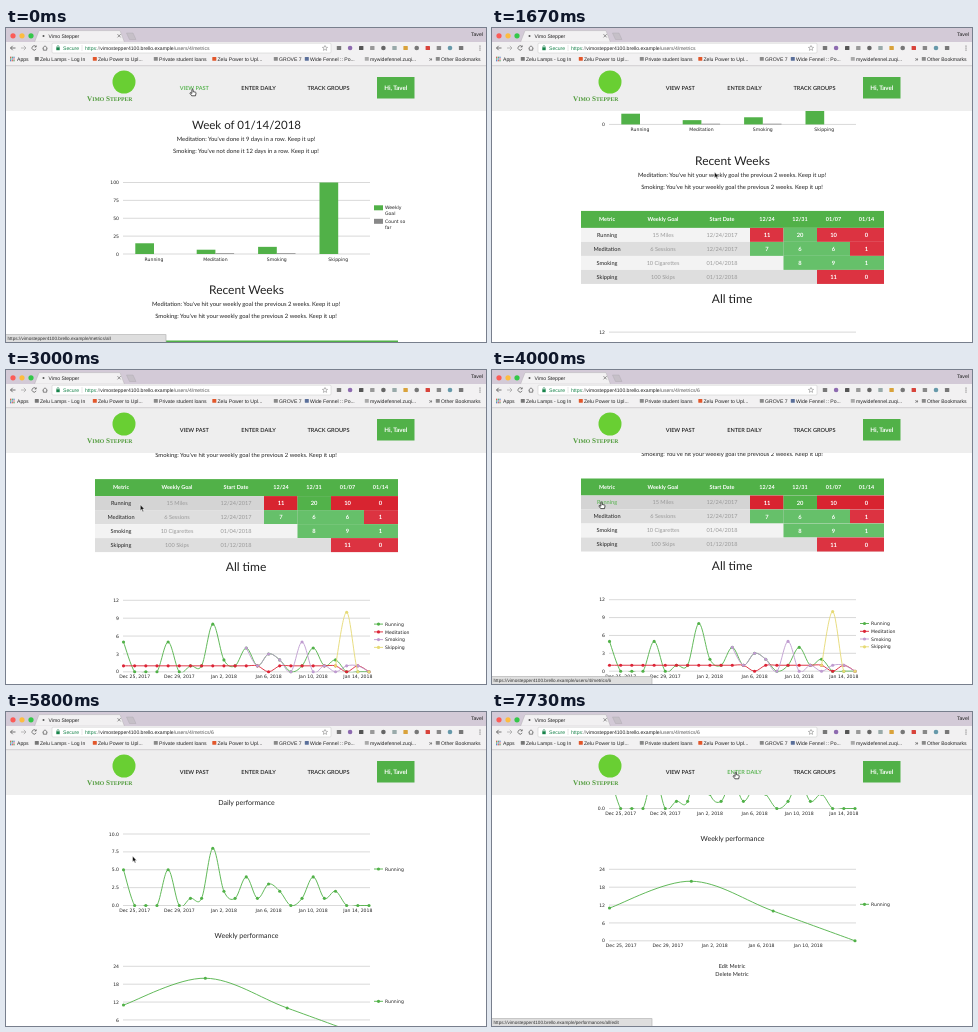
Write an HTML page that moves like this. It is 480 px wide and 314 px high and loops after 8000 ms.

```html
<!DOCTYPE html>
<html lang="en">
<head>
<meta charset="utf-8">
<title>Vimo Stepper</title>
<style>
  html, body { margin: 0; width: 100%; height: 100%; overflow: hidden; background: #fff; }
  svg { display: block; width: 480px; height: 314px; }
  text { text-rendering: geometricPrecision; white-space: pre; }
  .ui { font-family: "Liberation Sans", Arial, sans-serif; }
  .page { font-family: Lato, "Open Sans", sans-serif; }
  .chart { font-family: "DejaVu Sans", Verdana, sans-serif; }
  .row.light .bg { fill: #f3f3f3; }
  .row.dark .bg { fill: #dedede; }
  .row.on .bg { fill: #d4d4d4; }
  .good { fill: #66c06a; }
  .bad { fill: #dc3341; }
  .on .good { fill: #52b24a; }
  .on .bad { fill: #d82430; }
  .link { fill: #222; }
  .link.on { fill: #51b148; }
</style>
</head>
<body>
<svg id="stage" viewBox="0 0 480 314"></svg>
<script>
const GREEN = '#51b148', RED = '#dc2436', PURPLE = '#bf9bd0', YELLOW = '#e6da74';
const HOST = 'vimostepper4100.brello.example';
const LOOP = 8000, TICK = 1000 / 15;

// y is the middle of the lower-case letters
const text = (x, y, str, size, o = {}) =>
  `<text x="${x}" y="${y + size * 0.35}" font-size="${size}" fill="${o.fill || '#222'}"` +
  ` text-anchor="${o.anchor || 'start'}" font-weight="${o.weight || 400}"` +
  `${o.cls ? ` class="${o.cls}"` : ''}${o.id ? ` id="${o.id}"` : ''}>${str}</text>`;
const mid = (x, y, str, size, o = {}) => text(x, y, str, size, { ...o, anchor: 'middle' });
const rect = (x, y, w, h, fill, more = '') =>
  `<rect x="${x}" y="${y}" width="${w}" height="${h}" fill="${fill}" ${more}/>`;
const dot = (x, y, r, fill) => `<circle cx="${x}" cy="${y}" r="${r}" fill="${fill}"/>`;
const line = (d, stroke, w = 0.7, more = '') =>
  `<path d="${d}" fill="none" stroke="${stroke}" stroke-width="${w}" ${more}/>`;

// ---------- charts ----------
const LEFT = 117.5, RIGHT = 363, PLOT_H = 71.5;

function grid(top, labels) {
  return labels.map((label, i) => {
    const y = top + PLOT_H * i / (labels.length - 1);
    return line(`M117 ${y}H364`, '#d0d0d0', 0.8) +
      text(113, y, label, 4.6, { anchor: 'end' });
  }).join('');
}

function dateAxis(y, step, count) {
  const names = ['Dec 25, 2017', 'Dec 29, 2017', 'Jan 2, 2018', 'Jan 6, 2018', 'Jan 10, 2018', 'Jan 14, 2018'];
  return names.slice(0, count).map((n, i) => mid(LEFT + step * (1 + 4 * i), y, n, 4.6)).join('');
}

function curve(points) {
  let d = 'M' + points[0];
  for (let i = 0; i + 1 < points.length; i++) {
    const a = points[i], b = points[i + 1];
    const before = points[i - 1] || a, after = points[i + 2] || b;
    const c1 = a.map((v, k) => v + (b[k] - before[k]) / 6);
    const c2 = b.map((v, k) => v - (after[k] - a[k]) / 6);
    d += `C${c1} ${c2} ${b}`;
  }
  return d;
}

function series(values, top, max, color, clip, slots = values.length) {
  const step = (RIGHT - LEFT) / (slots - 1), skip = slots - values.length;
  const points = values.map((v, i) => [LEFT + step * (i + skip), top + PLOT_H * (1 - v / max)]);
  return line(curve(points), color, 0.9, `clip-path="url(#${clip})"`) +
    points.map(p => dot(p[0], p[1], 1.55, color)).join('');
}

const clipBox = (id, top) =>
  `<clipPath id="${id}">${rect(114, top - 3, 253, PLOT_H + 3.5, '#000')}</clipPath>`;
const legend = (y, name, color) =>
  line(`M368 ${y}H377`, color, 0.9) + dot(372.5, y, 1.6, color) + text(379, y, name, 4.6);

const running = [5, 0, 0, 0, 5, 0, 1, 1, 8, 2, 1, 4, 1, 3, 2, 0, 1, 4, 1, 2, 0, 0, 0];
const meditation = running.map((v, i) => [13, 20, 22].includes(i) ? 0 : 1);
const smoking = [4, 1, 3, 2, 0, 5, 0, 1, 0, 1, 1, 0];
const skipping = [1, 10, 0, 0];

// ---------- first page ----------
function barChart() {
  const top = 154.5, base = top + PLOT_H;
  const bars = [['Running', 15, 0], ['Meditation', 6, 1], ['Smoking', 10, 1], ['Skipping', 100, 0]];
  const bar = (x, v, fill) => rect(x, base - v * PLOT_H / 100, 18.7, v * PLOT_H / 100, fill);
  return grid(top, [100, 75, 50, 25, 0]) +
    bars.map(([name, goal, count], i) => {
      const x = 148 + 61.4 * i;
      return bar(x - 18.7, goal, GREEN) + bar(x, count, '#888') + mid(x, base + 5, name, 4.6);
    }).join('') +
    rect(368, 177.3, 9, 5, GREEN) + text(379, 179.8, 'Weekly', 4.6) + text(379, 185.8, 'Goal', 4.6) +
    rect(368, 190.8, 9, 5, '#888') + text(379, 193.3, 'Count so', 4.6) + text(379, 199.3, 'far', 4.6);
}

const TABLE_Y = 312.5, HEAD_H = 17, ROW_H = 14;

function table() {
  const centres = [115, 171, 230, 275, 308, 341.5, 374.5];
  const edges = [258, 291.5, 325, 358, 392];
  const heads = ['Metric', 'Weekly Goal', 'Start Date', '12/24', '12/31', '01/07', '01/14'];
  // a leading minus marks a missed goal
  const rows = [
    ['Running', '15 Miles', '12/24/2017', '-11', '20', '-10', '-0'],
    ['Meditation', '6 Sessions', '12/24/2017', '7', '6', '6', '-1'],
    ['Smoking', '10 Cigarettes', '01/04/2018', '', '8', '9', '1'],
    ['Skipping', '100 Skips', '01/12/2018', '', '', '-11', '-0']
  ];
  const head = rect(89, TABLE_Y, 303, HEAD_H, GREEN) + heads.map((h, i) =>
    mid(centres[i], TABLE_Y + 8.3, h, 5.5, { fill: '#fff', weight: 700 })).join('');
  return head + rows.map((cells, r) => {
    const y = TABLE_Y + HEAD_H + r * ROW_H;
    const body = cells.map((c, i) => {
      if (i < 3) {
        return mid(centres[i], y + 7, c, 5.6, i ? { fill: '#999' }
          : { cls: 'link', id: r ? '' : 'metricLink' });
      }
      if (!c) return '';
      const cls = c[0] === '-' ? 'bad' : 'good', x = edges[i - 3];
      return `<rect x="${x}" y="${y}" width="${edges[i - 2] - x}" height="${ROW_H}" class="${cls}"/>` +
        mid(centres[i], y + 7, c.replace('-', ''), 5.8, { fill: '#fff', weight: 700 });
    }).join('');
    return `<g class="row ${r % 2 ? 'dark' : 'light'}">` +
      `<rect class="bg" x="89" y="${y}" width="303" height="${ROW_H}"/>${body}</g>`;
  }).join('');
}

function overview() {
  const top = 433.7;
  return mid(240.5, 97, 'Week of 01/14/2018', 11.5) +
    mid(240, 111.3, "Meditation: You've done it 9 days in a row. Keep it up!", 5.9) +
    mid(240, 123.3, "Smoking: You've not done it 12 days in a row. Keep it up!", 5.9) +
    `<g class="chart">${barChart()}</g>` +
    mid(240.5, 262, 'Recent Weeks', 12) +
    mid(240, 276.3, "Meditation: You've hit your weekly goal the previous 2 weeks. Keep it up!", 5.9) +
    mid(240, 288.3, "Smoking: You've hit your weekly goal the previous 2 weeks. Keep it up!", 5.9) +
    table() +
    mid(240, 400, 'All time', 12) +
    `<g class="chart">${clipBox('allClip', top)}${grid(top, [12, 9, 6, 3, 0])}` +
    series(running, top, 12, GREEN, 'allClip') +
    series(meditation, top, 12, RED, 'allClip') +
    series(smoking, top, 12, PURPLE, 'allClip', 23) +
    series(skipping, top, 12, YELLOW, 'allClip', 23) +
    dateAxis(510, 11.16, 6) +
    legend(457.5, 'Running', GREEN) + legend(465.3, 'Meditation', RED) +
    legend(473, 'Smoking', PURPLE) + legend(480.8, 'Skipping', YELLOW) + '</g>';
}

// ---------- second page ----------
function detail() {
  const day = 31, week = 163.3;
  return mid(240.5, 0, 'Daily performance', 7) +
    mid(240.5, 132.5, 'Weekly performance', 7) +
    `<g class="chart">${clipBox('dayClip', day)}${clipBox('weekClip', week)}` +
    grid(day, ['10.0', '7.5', '5.0', '2.5', '0.0']) + series(running, day, 10, GREEN, 'dayClip') +
    dateAxis(107.2, 11.16, 6) + legend(66, 'Running', GREEN) +
    grid(week, [24, 18, 12, 6, 0]) + series([11, 20, 10, 0], week, 24, GREEN, 'weekClip') +
    dateAxis(239.7, 11.69, 5) + legend(198.3, 'Running', GREEN) + '</g>' +
    mid(240, 260.3, 'Edit Metric', 5.5) + mid(240, 268.3, 'Delete Metric', 5.5);
}

// ---------- browser window ----------
function browser() {
  const marks = [[34, 'Zelu Lamps - Log In', '#777'], [92, 'Zelu Power to Upl...', '#e2572b'],
    [153, 'Private student loans', '#8a8a8a'], [211.5, 'Zelu Power to Upl...', '#e2572b'],
    [273, 'GROVE 7', '#8a8a8a'], [304, 'Wide Fennel :: Po...', '#5a6f9a'],
    [364, 'mywidefennel.zuqi...', '#aaa'], [435, 'Other Bookmarks', '#8a8a8a']];
  const tools = ['#777', '#8d6ab0', '#555', '#999', '#666', '#9aa', '#d9a23b', '#777', '#d8433b', '#888', '#69a', '#777'];
  return rect(0, 0, 480, 14, '#d3cad7') + rect(0, 14, 480, 24, '#f2f1f2') +
    dot(7, 7.8, 2.6, '#fc5b57') + dot(16, 7.8, 2.6, '#fdbc40') + dot(25, 7.8, 2.6, '#34c749') +
    '<path d="M28.5 14.2L33 2.6H114L118.5 14.2Z" fill="#f2f1f2" stroke="#b4b1b4" stroke-width=".5"/>' +
    rect(28, 14, 91, 1, '#f2f1f2') +
    '<path d="M120.5 5H127L130 11.5H123.5Z" fill="#c6c0c8" stroke="#aaa5ac" stroke-width=".4"/>' +
    dot(37.5, 8, 1, '#555') + text(42.5, 8, 'Vimo Stepper', 5.1) +
    line('M111.5 6.2L114.7 9.4M114.7 6.2L111.5 9.4', '#666', 0.7) +
    text(477, 6, 'Tavel', 5.2, { anchor: 'end' }) +
    line('M9.5 20H4.5M6.7 17.8L4.5 20L6.7 22.2', '#555', 0.8) +
    line('M15 20H20M17.8 17.8L20 20L17.8 22.2', '#aaa', 0.8) +
    line('M30 18.7A2.2 2.2 0 1 0 30.2 20.8M30.2 17.4V19H28.6', '#555', 0.7) +
    line('M36.5 20.2L39 17.8L41.5 20.2M37.3 19.8V22.2H40.7V19.8', '#555', 0.7) +
    rect(46, 15.2, 279, 9.8, '#fff', 'rx="1" stroke="#c4c4c4" stroke-width=".5"') +
    rect(50.3, 19.3, 3.4, 2.9, '#17834a') + line('M51 19.5V18.6A1 1 0 0 1 53 18.6V19.5', '#17834a', 0.6) +
    text(57, 20, 'Secure', 5.1, { fill: '#17834a' }) + line('M76 17V23', '#ccc', 0.5) +
    `<text x="79" y="21.8" font-size="5.08" fill="#17834a">https<tspan fill="#777">://</tspan>` +
    `<tspan fill="#222">${HOST}</tspan><tspan fill="#555" id="path"></tspan></text>` +
    line('M319 17.5L319.8 19.2L321.6 19.4L320.2 20.6L320.6 22.4L319 21.4L317.4 22.4L317.8 20.6L316.4 19.4L318.2 19.2Z', '#777', 0.5) +
    tools.map((c, i) => i % 3 === 1 ? dot(333 + i * 11.1, 20, 2.3, c)
      : rect(330.8 + i * 11.1, 17.9, 4.4, 4.2, c, 'rx=".6"')).join('') +
    [18, 20, 22].map(y => dot(474, y, 0.6, '#555')).join('') +
    [0, 1, 2].map(i => [0, 1, 2].map(j =>
      rect(4 + i * 1.7, 28.7 + j * 1.7, 1.2, 1.2, ['#d8504a', '#4a9a58', '#4a78c8'][(i + j) % 3])).join('')).join('') +
    text(11, 31, 'Apps', 5.1) + text(423, 31, '»', 6) +
    marks.map(([x, name, c]) => rect(x - 5.2, 29, 4, 3.8, c, 'rx=".5"') + text(x, 31, name, 5.1)).join('') +
    line('M0 37.7H480', '#b9b7b9', 0.6);
}

const nav = (x, label, id) =>
  mid(x, 59.6, label, 5.6, { weight: 600, cls: 'link', id });

const header = () => rect(0, 38, 480, 45, '#eeeeee') +
  dot(118, 54, 11.5, '#69cf33') +
  `<text x="81" y="73.2" font-size="7.2" fill="#4f9a3a" font-weight="700" font-family="'Liberation Serif', Times, serif">` +
  'V<tspan font-size="5.7">IMO</tspan> S<tspan font-size="5.7">TEPPER</tspan></text>' +
  nav(188.3, 'VIEW PAST', 'navPast') + nav(252.5, 'ENTER DAILY', 'navDaily') + nav(322.5, 'TRACK GROUPS', 'navGroups') +
  rect(371, 49, 37.5, 21.5, GREEN) + mid(389.8, 59.8, 'Hi, Tavel', 6.2, { fill: '#fff', weight: 700 });

const pointers = {
  arrow: '<path d="M0 0V6L1.4 4.8L2.4 7L3.4 6.6L2.4 4.4H4.2Z" fill="#111" stroke="#fff" stroke-width=".5"/>',
  hand: '<path d="M-.6 .3Q0-.4 .6 .3V2.5L3 3Q3.6 3.2 3.5 4L3 6.6H-.8L-2.6 4Q-2.4 3-1.4 3.7L-.6 4.3Z" fill="#fff" stroke="#111" stroke-width=".7"/>',
  beam: line('M-1.2-2.5Q0-2.5 0-1.7Q0-2.5 1.2-2.5M0-1.7V3.2M-1.2 4Q0 4 0 3.2Q0 4 1.2 4', '#111', 0.7)
};

document.getElementById('stage').innerHTML =
  rect(0, 0, 480, 314, '#fff') +
  `<g class="page"><g id="overview">${overview()}</g><g id="detail">${detail()}</g>${header()}</g>` +
  `<g class="ui">${browser()}<g id="status">` +
  rect(-1, 306.7, 161, 8, '#dedede', 'stroke="#aaa" stroke-width=".6"') +
  text(1.5, 310.3, '', 4.65, { id: 'statusText', fill: '#333' }) + '</g></g>' +
  '<g id="pointer">' + Object.keys(pointers).map(k => `<g id="${k}">${pointers[k]}</g>`).join('') + '</g>';

// ---------- motion: [time, value...] ----------
const pointerKeys = [[70, 186.5, 61.2], [560, 222.5, 144], [2470, 222.5, 144], [3230, 109.5, 132],
  [4400, 109.5, 132], [5100, 126.5, 144], [6870, 126.5, 144], [7700, 243.7, 60.2]];
const overviewKeys = [[730, 0], [870, 10], [1066, 37], [1666, 129.5], [2330, 202.5], [2700, 202.5], [3200, 204]];
const detailKeys = [[4700, 124], [5200, 112], [5800, 91], [5930, 76], [6050, 70], [6330, -6]];

function at(keys, t, ease = u => u) {
  if (t <= keys[0][0]) return keys[0].slice(1);
  const i = keys.findIndex(k => k[0] > t);
  if (i < 0) return keys[keys.length - 1].slice(1);
  const a = keys[i - 1], b = keys[i], u = ease((t - a[0]) / (b[0] - a[0]));
  return a.slice(1).map((v, k) => v + (b[k + 1] - v) * u);
}
const smooth = u => u * u * (3 - 2 * u);

const $ = id => document.getElementById(id);
const show = (id, on) => $(id).setAttribute('visibility', on ? 'visible' : 'hidden');
const move = (id, x, y) => $(id).setAttribute('transform', `translate(${x} ${y})`);
const rows = [...document.querySelectorAll('.row')];

function draw(t) {
  const [x, y] = at(pointerKeys, t, smooth);
  const [scroll] = at(overviewKeys, t);
  const first = t < 4390;
  const onPast = t < 190, onMetric = first && t >= 3130, onDaily = t >= 7720;

  $('overview').style.display = first ? '' : 'none';
  $('detail').style.display = first ? 'none' : '';
  move('overview', 0, -scroll);
  move('detail', 0, at(detailKeys, t)[0]);

  const hovered = x > 89 && x < 392 ? Math.floor((y + scroll - TABLE_Y - HEAD_H) / ROW_H) : -1;
  rows.forEach((row, i) => row.classList.toggle('on', i === hovered));
  $('navPast').classList.toggle('on', onPast);
  $('navDaily').classList.toggle('on', onDaily);
  $('metricLink').classList.toggle('on', onMetric);

  $('path').textContent = '/users/4/metrics' + (t >= 3790 ? '/6' : '');
  const target = onPast ? '/metrics/all' : onMetric ? '/users/4/metrics/6' : onDaily ? '/performances/all/edit' : '';
  show('status', target);
  $('statusText').textContent = target && 'https://' + HOST + target;

  const kind = target ? 'hand' : t >= 2260 && t < 2700 ? 'beam' : 'arrow';
  Object.keys(pointers).forEach(k => show(k, k === kind));
  move('pointer', x, y);
}

const start = performance.now();
function frame() {
  const t = (performance.now() - start) % LOOP;
  // the small lead lets times rounded to 10 ms land on their own tick
  draw(Math.floor((t + 6) / TICK) * TICK);
  requestAnimationFrame(frame);
}
frame();
</script>
</body>
</html>
```
